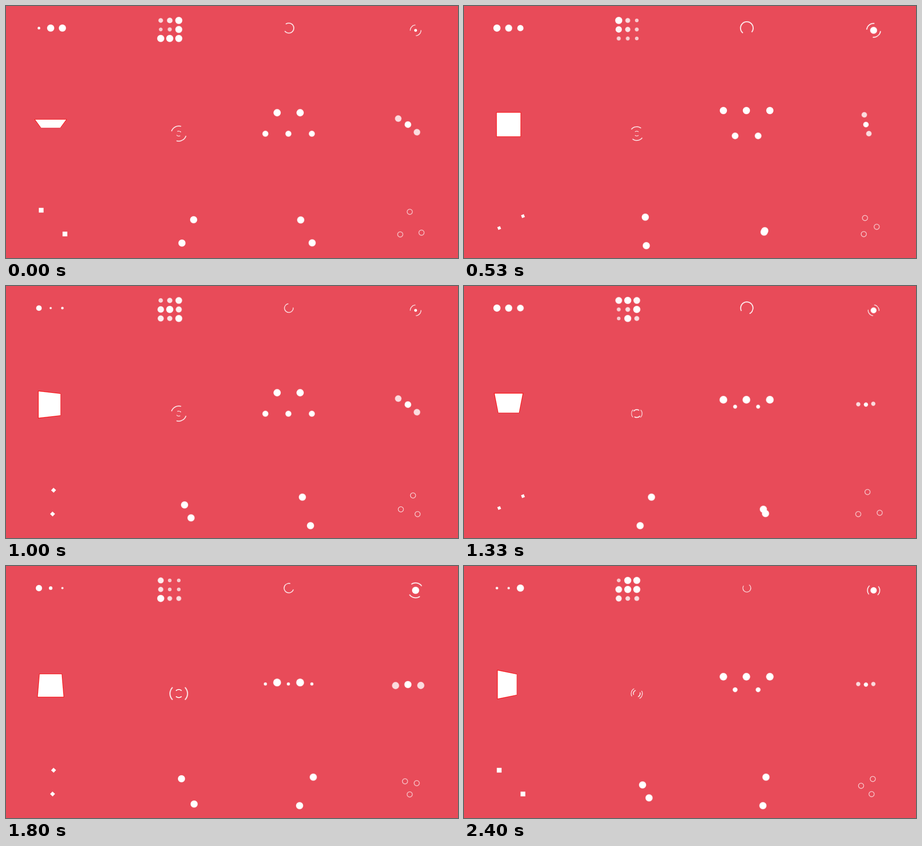
Write an HTML page that moves like this. It is 1002 by 559 pixels and loops after 2.47 s.

```html
<!DOCTYPE html>
<html lang="en">
<head>
<meta charset="utf-8">
<title>Loaders</title>
<style>
html, body { margin: 0; width: 100%; height: 100%; overflow: hidden; background: #e84b59; }
b { position: absolute; width: 0; height: 0; transform: scale(1.0535); }
i {
  position: absolute; width: 15px; height: 15px; translate: -50% -50%;
  background: #fff; border-radius: 50%; animation-play-state: paused !important;
}

.pulse { animation: scale .75s cubic-bezier(.2, .68, .18, 1.08) infinite; }
.grid { animation: grid 1s ease infinite; }

.clip, .ring, .outer, .inner { background: none; border: 2px solid #fff; }
.clip { width: 25px; height: 25px; border-bottom-color: transparent; animation: rotate .75s linear infinite; }
.core { width: 16px; height: 16px; animation: scale 1s cubic-bezier(.09, .57, .49, .9) infinite; }
.ring { width: 30px; height: 30px; border-color: #fff transparent; animation: rotate 1s cubic-bezier(.09, .57, .49, .9) infinite; }
.outer { width: 35px; height: 35px; border-color: transparent #fff; animation: rotate 1s ease-in-out infinite; }
.inner { border-color: #fff transparent; animation: rotate .5s ease-in-out infinite reverse; }

.spin { width: 50px; height: 50px; border: 1px solid red; border-radius: 0; animation: spin 3s cubic-bezier(.09, .57, .49, .9) infinite; }
.odd { animation: odd 1s cubic-bezier(.15, .46, .9, .6) infinite; }
.even { animation: even 1s cubic-bezier(.15, .46, .9, .6) infinite; }

.trio { animation: rotate 1s cubic-bezier(.7, -.13, .22, .86) infinite; }
.trio::before, .trio::after {
  content: ""; position: absolute; top: 2px; left: -26px; width: 15px; height: 15px;
  background: #fff; border-radius: 50%; opacity: .8;
}
.trio::after { left: 27px; }

.cube { width: 10px; height: 10px; border-radius: 0; animation: cube 1.6s ease-in-out infinite; }
.zig { animation: zig .7s linear infinite; }
.zag { animation: zag .7s linear infinite; }
.zig2 { animation: zig2 1.5s linear infinite; }
.zag2 { animation: zag2 1.5s linear infinite; }
.tri1, .tri2, .tri3 { width: 10px; height: 10px; background: none; border: 1px solid #fff; }
.tri1 { animation: tri1 2s ease-in-out infinite; }
.tri2 { animation: tri2 2s ease-in-out infinite; }
.tri3 { animation: tri3 2s ease-in-out infinite; }

@keyframes scale { 30% { transform: scale(.3); } 100% { transform: scale(1); } }
@keyframes grid { 50% { transform: scale(.5); opacity: .7; } 100% { transform: scale(1); opacity: 1; } }
@keyframes rotate {
  0% { transform: rotate(0deg) scale(1); }
  50% { transform: rotate(180deg) scale(.6); }
  100% { transform: rotate(360deg) scale(1); }
}
@keyframes spin {
  0%, 100% { transform: perspective(100px) rotateX(0) rotateY(0); }
  25% { transform: perspective(100px) rotateX(180deg) rotateY(0); }
  50% { transform: perspective(100px) rotateX(180deg) rotateY(180deg); }
  75% { transform: perspective(100px) rotateX(0) rotateY(180deg); }
}
@keyframes even {
  0% { transform: scale(1.1); }
  25% { transform: translateY(-30px); }
  50% { transform: scale(.4); }
  75% { transform: translateY(30px); }
  100% { transform: scale(1); }
}
@keyframes odd {
  0% { transform: scale(.4); }
  25% { transform: translateY(30px); }
  50% { transform: scale(1.1); }
  75% { transform: translateY(-30px); }
  100% { transform: scale(.75); }
}
@keyframes cube {
  25% { transform: translateX(50px) scale(.5) rotate(-90deg); }
  50% { transform: translate(50px, 50px) rotate(-180deg); }
  75% { transform: translateY(50px) scale(.5) rotate(-270deg); }
  100% { transform: rotate(-360deg); }
}
@keyframes zig { 33% { transform: translate(-15px, -30px); } 66% { transform: translate(15px, -30px); } 100% { transform: translate(0, 0); } }
@keyframes zag { 33% { transform: translate(15px, 30px); } 66% { transform: translate(-15px, 30px); } 100% { transform: translate(0, 0); } }
@keyframes zig2 {
  17%, 84% { transform: translate(-15px, -30px); }
  34%, 67% { transform: translate(15px, -30px); }
  50%, 100% { transform: translate(0, 0); }
}
@keyframes zag2 {
  17%, 84% { transform: translate(15px, 30px); }
  34%, 67% { transform: translate(-15px, 30px); }
  50%, 100% { transform: translate(0, 0); }
}
@keyframes tri1 { 33% { transform: translate(25px, -50px); } 66% { transform: translate(50px, 0); } 100% { transform: translate(0, 0); } }
@keyframes tri2 { 33% { transform: translate(25px, 50px); } 66% { transform: translate(-25px, 50px); } 100% { transform: translate(0, 0); } }
@keyframes tri3 { 33% { transform: translate(-50px, 0); } 66% { transform: translate(-25px, -50px); } 100% { transform: translate(0, 0); } }
</style>
</head>
<body>
<script>
const LOOP = 2470, LEAD = 15205, FPS = 15;

// Adds a part centred on (x, y)
function add(name, x, y, delay = 0, duration) {
  const spot = document.createElement('b'), part = document.createElement('i');
  spot.style.left = x + 'px';
  spot.style.top = y + 'px';
  part.className = name;
  part.style.animationDelay = delay + 's';
  if (duration) part.style.animationDuration = duration + 's';
  spot.append(part);
  document.body.append(spot);
}

[73.2, 98.6, 124.9].forEach((x, i) => add('pulse', x, 49, .12 * (i + 1)));

const delays = [-.06, .25, -.17, .48, .31, .03, .46, .78, .45];
const durations = [.72, 1.02, 1.28, 1.42, 1.45, 1.18, .87, 1.45, 1.06];
delays.forEach((d, i) => add('grid', 343.3 + i % 3 * 20, 32 + Math.floor(i / 3) * 20, d, durations[i]));

add('clip', 627, 49);
add('core', 908, 53.8);
add('ring', 908, 53.8);
add('spin', 99.2, 262.7);
add('outer', 383.4, 283);
add('inner', 383.4, 283);
for (let i = 0; i < 5; i++) add(i % 2 ? 'even' : 'odd', 575.2 + i * 25.6, 260);
add('trio', 890.7, 263.2);
add('cube', 78, 452.5);
add('cube', 78, 452.5, -.8);
add('zig', 402.5, 499.5);
add('zag', 402.5, 499.5);
add('zig2', 666, 499.5);
add('zag2', 666, 499.5);
add('tri1', 870.2, 506.2);
add('tri2', 896.5, 453.5);
add('tri3', 922.9, 506.2);

const moves = document.getAnimations();

// Time advances in steps of 1/15 s, aligned to hundredths of a second
function draw(now) {
  const hundredths = Math.floor(now % LOOP / 10);
  const step = Math.floor((hundredths + .34) * FPS / 100);
  for (const move of moves) move.currentTime = LEAD + step * 1000 / FPS;
}

function tick() {
  draw(performance.now());
  requestAnimationFrame(tick);
}
tick();
</script>
</body>
</html>
```
